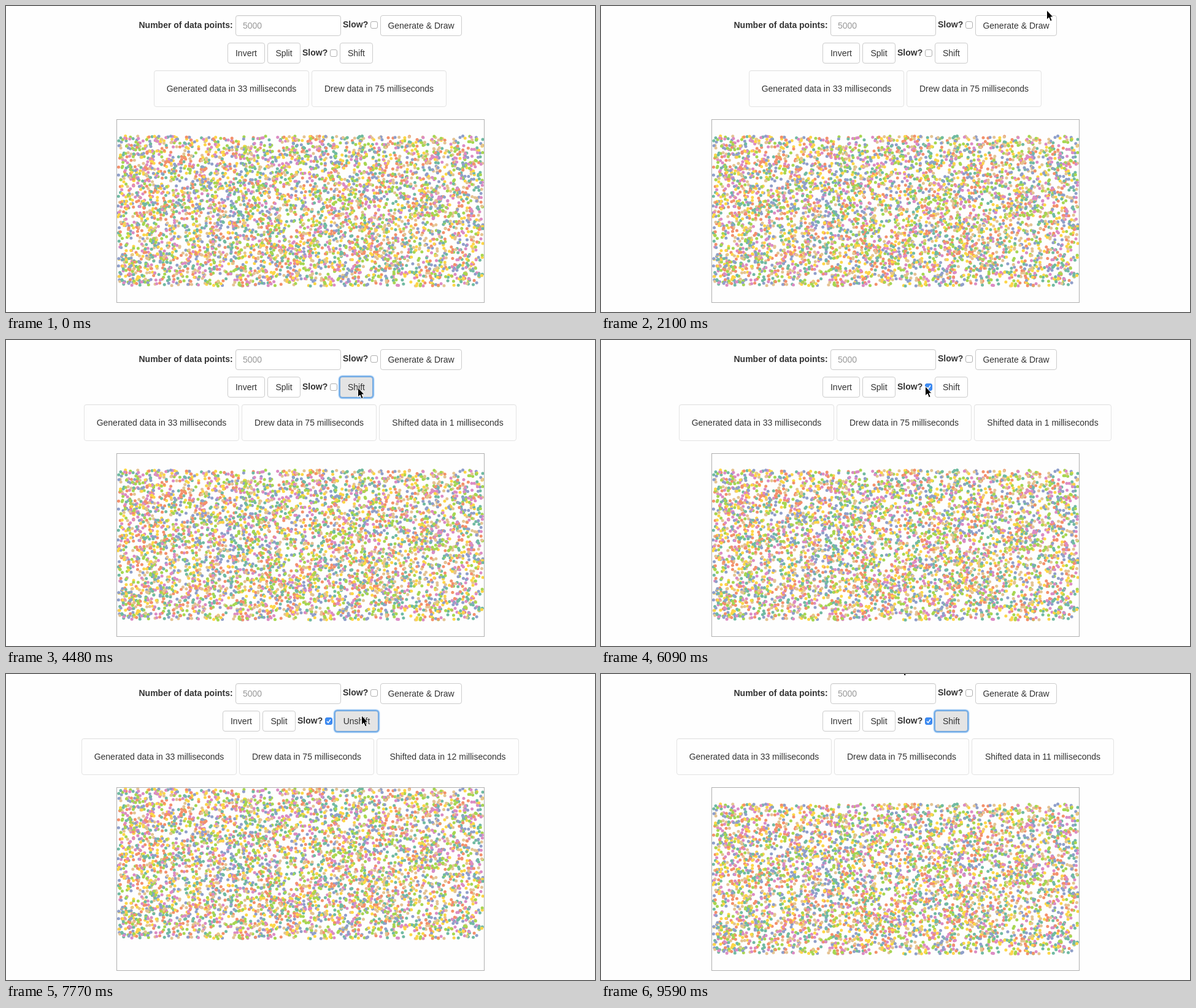
Animation of 960x500 px, one loop 9940 ms. Source, as an HTML page with a canvas:

```html
<!DOCTYPE html>
<html lang="en">
<head>
<meta charset="utf-8">
<title>Data points</title>
<style>
html, body { margin: 0; width: 100%; height: 100%; overflow: hidden; background: #fefefe; }
#stage {
  position: absolute; left: 0; top: 0; width: 960px; height: 500px; overflow: hidden;
  font: 14px "Liberation Sans", Arial, sans-serif; color: #333;
}
#stage > * { position: absolute; box-sizing: border-box; white-space: nowrap; }
.btn, .field { height: 34px; line-height: 32px; border: 1px solid #ccc; border-radius: 4px; background: #fff; text-align: center; }
.field { text-align: left; padding-left: 11px; color: #999; box-shadow: inset 0 1px 1px rgba(0,0,0,.07); }
.btn.hot { background: #e4e4e4; border-color: #adadad; }
.btn.focus { box-shadow: 0 0 0 1.5px #75b0ec, 0 0 2px 2px #9cc8f4; border-color: #76a6d8; }
.btn.down { background: #d8d8d8; }
.label { height: 34px; line-height: 34px; font-weight: bold; }
.check { width: 12px; height: 12px; border: 1px solid #b0b0b0; border-radius: 3px; background: #fff; }
.check.down { background: #d0d0d0; }
.check.on { background: #3f8df3; border-color: #3480ea; }
.check svg { position: absolute; left: 0; top: 0; display: none; }
.check.on svg { display: block; }
.well { top: 105px; height: 60px; line-height: 58px; border: 1px solid #e3e3e3; border-radius: 4px; text-align: center; box-shadow: inset 0 1px 1px rgba(0,0,0,.03); }
#plot { left: 180px; top: 185px; width: 600px; height: 300px; border: 1px solid #b0b0b0; background: #fefefe; overflow: hidden; }
#dots { position: absolute; left: -1px; top: -1px; }
#mouse { left: 0; top: 0; overflow: visible; }
</style>
</head>
<body>
<div id="stage"></div>
<script>
const LOOP = 9940, STEP = 70;
const stage = document.getElementById('stage');

function add(cls, x, y, w, text = '') {
  const el = document.createElement('div');
  el.className = cls;
  el.style.top = y + 'px';
  el.textContent = text;
  stage.append(el);
  put(el, x, w);
  return el;
}
function put(el, x, w) {
  el.style.left = x + 'px';
  if (w) el.style.width = w + 'px';
}

add('label', 216.5, 14, 0, 'Number of data points:');
add('field', 374, 15, 172, '5000');
add('label', 549, 13, 0, 'Slow?');
add('check', 594, 25);
add('btn', 610, 15, 133, 'Generate & Draw');

const invert = add('btn', 361, 60, 61, 'Invert');
const split = add('btn', 426, 60, 54, 'Split');
const slow = add('label', 483, 59, 0, 'Slow?');
const check = add('check', 528, 71);
check.innerHTML = '<svg width="10" height="10"><path d="M2 5.2L4.2 7.6L8 2.2" fill="none" stroke="#fff" stroke-width="1.6"/></svg>';
const shift = add('btn', 544, 60, 54, 'Shift');

const made = add('well', 241, 105, 253, 'Generated data in 33 milliseconds');
const drew = add('well', 498, 105, 220, 'Drew data in 75 milliseconds');
const moved = add('well', 608, 105, 224);

const plot = add('', 180, 185, 600);
plot.id = 'plot';
plot.innerHTML = '<canvas id="dots" width="600" height="300"></canvas>';
const dots = plot.firstChild;

stage.insertAdjacentHTML('beforeend',
  '<svg id="mouse" width="12" height="20"><path d="M.5 .8V16.2L4.1 12.9L6.4 18.8L9.2 17.7L6.9 12H11.2Z" fill="#000" stroke="#fff"/></svg>');
const mouse = document.getElementById('mouse');

function drawDots() {
  const g = dots.getContext('2d');
  const colors = ['#70baa2', '#f3906b', '#8f9fca', '#dc8bc3', '#a6d651', '#fdd648', '#e4c392'];
  let seed = 20147;
  const rnd = () => (seed = (seed * 16807) % 2147483647) / 2147483647;
  for (let i = 0; i < 5000; i++) {
    g.fillStyle = colors[Math.floor(rnd() * colors.length)];
    g.beginPath();
    g.arc(2.5 + rnd() * 595, 27.5 + rnd() * 245, 2.5, 0, 7);
    g.fill();
  }
}

// Pointer moves: start, end, then four Bezier points as x, y pairs
const moves = [
  [2100, 2730, 726, 6, 690, 195, 600, 212, 573, 77],
  [5040, 5740, 573, 77, 560, 80, 540, 78, 528, 75],
  [6860, 7490, 528, 75, 545, 76, 565, 72, 579, 67],
  [8960, 9450, 579, 67, 560, 45, 515, 10, 488, -16]
];

function pointer(t) {
  const m = moves.filter(m => t >= m[0]).pop();
  if (!m || t < 2100) return null;
  const first = m === moves[0] ? m[0] : m[0] - STEP;
  const k = Math.min(1, (t - first) / (m[1] - first));
  const u = k * k * (3 - 2 * k), v = 1 - u;
  const axis = i => v * v * v * m[i] + 3 * v * v * u * m[i + 2] + 3 * v * u * u * m[i + 4] + u * u * u * m[i + 6];
  return [axis(2), axis(3)];
}

const within = (t, a, b) => t >= a && t < b;

function render(time) {
  const t = Math.floor(time / STEP) * STEP;
  const up = within(t, 3360, 4480) || within(t, 7770, 8470);
  const dx = up ? -8 : 0;
  put(invert, 361 + dx);
  put(split, 426 + dx);
  put(slow, 483 + dx);
  put(check, 528 + dx);
  put(shift, 544 + dx, up ? 71 : 54);
  shift.textContent = up ? 'Unshift' : 'Shift';
  dots.style.transform = `translateY(${up ? -25 : 0}px)`;

  const ms = t < 3360 ? -1 : t < 4480 ? 0 : t < 7770 ? 1 : t < 8470 ? 12 : 11;
  const left = ms < 0 ? 241 : ms > 9 ? 123 : 127;
  put(made, left);
  put(drew, left + 257);
  put(moved, left + 481, ms > 9 ? 232 : 224);
  moved.style.display = ms < 0 ? 'none' : 'block';
  moved.textContent = `Shifted data in ${ms} milliseconds`;

  const p = pointer(t);
  mouse.style.display = p ? 'block' : 'none';
  if (p) mouse.style.transform = `translate(${Math.round(p[0])}px,${Math.round(p[1])}px)`;

  const focus = within(t, 3290, 6020) || t >= 7700;
  const over = p && within(p[0], 544 + dx, 598 - dx) && within(p[1], 60, 94);
  shift.classList.toggle('focus', focus);
  shift.classList.toggle('hot', !!(focus || over));
  shift.classList.toggle('down', [3290, 4410, 7700].includes(t));
  check.classList.toggle('down', t === 6020);
  check.classList.toggle('on', t >= 6090);
}

drawDots();
const start = performance.now();
function tick() {
  render((performance.now() - start) % LOOP);
  requestAnimationFrame(tick);
}
tick();
</script>
</body>
</html>
```
